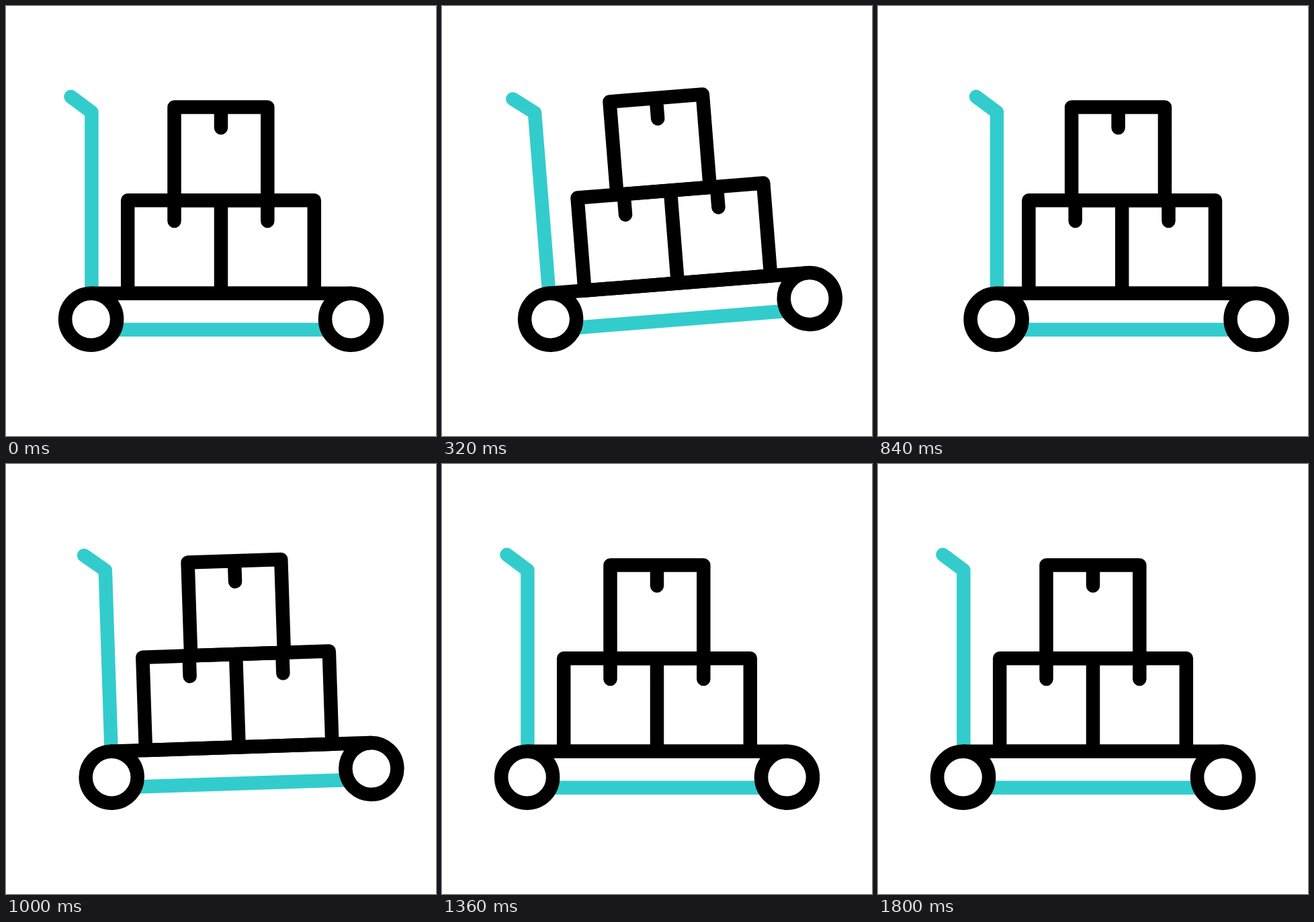
Recreate the animation shown at these times as an HTML page. Size 640 by 640 pixels, loop 2 s.

```html
<!DOCTYPE html>
<html lang="en">
<head>
<meta charset="utf-8">
<title>Cart with boxes</title>
<style>
  html, body { margin: 0; width: 100%; height: 100%; overflow: hidden; background: #fff; }
  svg { display: block; width: 100%; height: 100%; }
</style>
</head>
<body>
<svg viewBox="0 0 640 640" fill="none" stroke="#000" stroke-width="20.5" stroke-linecap="round" stroke-linejoin="round">
  <g id="cart">
    <g stroke="#33cccc">
      <path d="M96.5 135 127.4 158V427"/>
      <path d="M162 481.8H478" stroke-linecap="butt"/>
    </g>
    <path d="M126.6 427.7H513.5"/>
    <circle cx="126.6" cy="466.2" r="38.5"/>
    <circle cx="513.5" cy="466.2" r="38.5"/>
    <path id="lower" d="M181.2 289.3H458.8V427.7H181.2ZM320 289.3V427.7M250.5 289.3V320M389.3 289.3V320"/>
    <path id="upper" d="M250.5 150.5H389.3V289.3H250.5ZM320 150.5V181.3"/>
  </g>
</svg>
<script>
  const LOOP = 2000, STEP = 40;
  const cart = document.getElementById('cart');
  const lower = document.getElementById('lower');
  const upper = document.getElementById('upper');

  // Each track is a list of [time, value] keys, eased in and out between keys.
  const roll = [[40, 0], [544, 60], [653, 60], [1356, 0]];
  const tilt = [[40, 0], [544, 7.8], [640, 7.8], [840, 0], [1075, 2.5], [1353, 0], [1600, 1.25], [1800, 0]];
  const lowerSlide = [[278, 0], [600, -9.8], [1200, 0]];
  const upperSlide = [[160, 0], [600, -35.4], [993, 0]];

  function valueAt(track, t) {
    if (t <= track[0][0]) return track[0][1];
    for (let i = 1; i < track.length; i++) {
      const [t0, a] = track[i - 1], [t1, b] = track[i];
      if (t <= t1) {
        const p = (t - t0) / (t1 - t0);
        return a + (b - a) * p * p * (3 - 2 * p);
      }
    }
    return track[track.length - 1][1];
  }

  function draw(time) {
    const t = Math.floor(time % LOOP / STEP) * STEP;
    cart.setAttribute('transform',
      `translate(${valueAt(roll, t)}) rotate(${-valueAt(tilt, t)} 126.6 466.2)`);
    lower.setAttribute('transform', `translate(${valueAt(lowerSlide, t)})`);
    upper.setAttribute('transform', `translate(${valueAt(upperSlide, t)})`);
  }

  const start = performance.now();
  function tick() {
    draw(performance.now() - start);
    requestAnimationFrame(tick);
  }
  tick();
</script>
</body>
</html>
```
